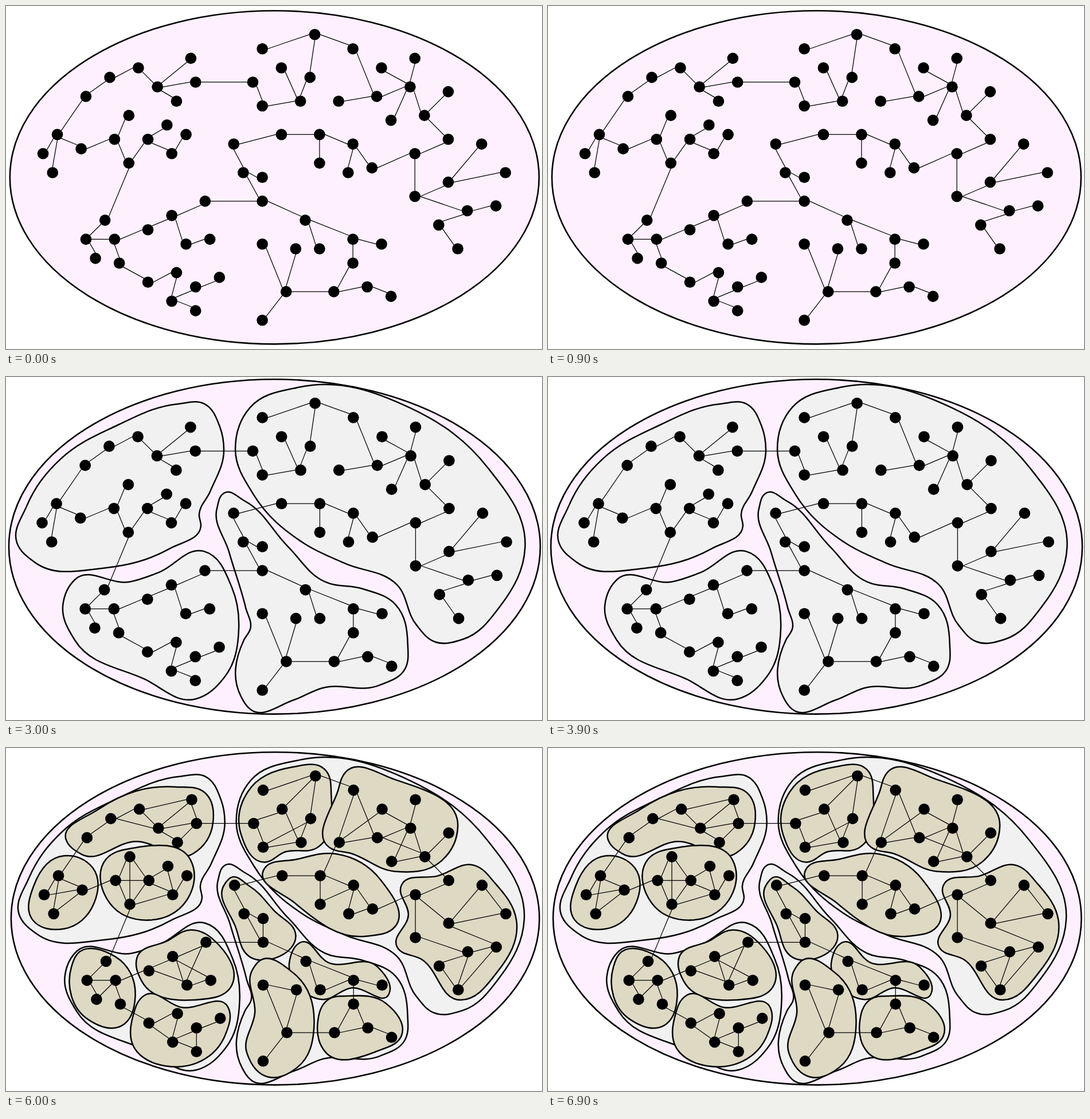
An HTML page that plays this animation: 935x599 px, repeating every 7500 ms.

```html
<!DOCTYPE html>
<html lang="en">
<head>
<meta charset="utf-8">
<title>Hierarchical clustering of a graph</title>
<style>
  html, body { margin: 0; width: 100%; height: 100%; overflow: hidden; background: #fff; }
  svg { display: block; width: 935px; height: 599px; }
</style>
</head>
<body>
<svg id="stage" viewBox="0 0 935 599"></svg>
<script>
const HOLD = 1500, UNIT = 8.3, PORT = 9.3;
const GREY = '#f1f1f1', PINK = '#fff0ff', YELLOW = '#ffff00', GREEN = '#c3d69b',
      ORANGE = '#fac090', TAN = '#ddd9c3', BLUE = '#c6d9f1', AQUA = '#b7dee8';

// Origin and size of one grid cell in each scene.
const scenes = [
  { x: 64.6, y: 49.8, s: 8.316 },
  { x: 62.8, y: 48.9, s: 8.33, regions: 'own' },
  { x: 63.0, y: 45.8, s: 8.352, regions: GREY },
  { x: 70.5, y: 47.8, s: 8.278, regions: GREY, clusters: 'own', bridge: true },
  { x: 66.6, y: 48.7, s: 8.302, regions: GREY, clusters: TAN, bridge: true, dense: true }
];

// Node positions in grid cells, by region.
const nodeGroups = [
  `31,5 20,7 14,9 24,11 32,10 28,14 9,13 3,21 0,25 2,29 8,24 15,22 18,17 18,27 22,22 26,19 27,25 30,21`,
  `44,10 46,15 54,14 50,7 56,9 57,0 46,3 65,3 70,13 62,14 77,11 71,7 78,5 73,18 80,17 85,12
   85,22 78,25 69,28 65,23 64,29 58,21 58,27 50,21 78,34 85,31 92,23 97,29 89,37 95,36 83,40 87,45`,
  `40,23 42,29 46,30 46,35 55,39 58,45 65,43 71,44 65,48 61,54 68,53 73,55 51,54 53,45 46,44 46,60`,
  `34,35 27,38 30,44 35,43 22,41 15,43 9,43 11,47 13,39 16,48 22,52 28,50 27,56 32,53 32,58 37,51`
];

// Edges as chains of node numbers.
const treeChains = `0-3-1-2-6-7-10-11-13-14-16-17 5-3-4-18 8-7-9 11-12 14-15 13-74
  18-19-20-22-23-25-26-28-32-34-35-36-37-39-41-50 20-21 23-24 26-27 29-28-30
  28-31 32-33 37-38 39-40 35-42-46-48-49 44-43-45 46-47
  50-51-53-54-56-58-59-62-65 51-52 54-55 56-57 59-60-61 63-62-64
  53-66-67-70-71-75-76-77-78-79-81 67-68-69 71-72-73 72-74 78-80`;
const sparseChains = '42-43';
const bridgeChains = '27-39';
const denseChains = `2-3 1-0-4-5 8-10-9 13-12-14-11 15-16-13 23-21-18 19-22 25-27-29
  26-32-31 40-37 38-36 35-43-47-49-46 44-45 52-53 55-56 58-60 63-64
  73-71 67-69 70-68-66 76-78 79-80`;

// Key points of each outline; the curve between them is computed.
const regions = [
  [GREY, `300,50 345,50 372,90 379,130 355,203 336,243 339,263 285,302 170,336 50,326 19,292 36,228
    95,146 190,89`],
  [YELLOW, `510,21 425,56 399,130 430,207 520,294 590,328 680,365 714,435 745,464 795,460 860,402
    903,300 838,161 705,58`],
  [GREEN, `380,205 367,232 388,308 417,405 425,442 414,461 409,560 425,582 500,566 550,545 650,540
    694,512 699,470 678,400 620,372 555,360 490,298 415,219`],
  [ORANGE, `345,307 393,370 405,440 380,526 330,564 240,529 120,462 99,400 120,356 215,360 265,344`]
];
const clusters = [
  [GREEN, '300,67 350,77 364,130 330,183 230,162 135,184 109,160 165,106'],
  [AQUA, '105,187 155,208 157,270 105,314 50,298 52,240'],
  [TAN, '228,173 325,194 318,265 250,299 185,270 178,193'],
  [TAN, '500,33 558,36 570,85 545,173 490,180 452,198 413,150 425,75'],
  [GREEN, '595,41 680,54 790,135 760,197 680,214 605,183 566,172 581,75'],
  [BLUE, '580,184 655,228 681,310 630,327 505,268 452,212 510,193'],
  [YELLOW, '820,204 855,235 892,300 858,390 795,438 728,368 684,345 704,290 692,238 755,222'],
  [YELLOW, '395,225 428,240 470,282 508,325 430,364 403,310 384,237'],
  [TAN, '516,338 565,373 650,380 670,428 605,417 553,437 497,372'],
  [BLUE, '600,431 665,444 692,500 650,527 560,529 546,480 565,437'],
  [GREEN, '445,370 505,392 540,480 510,556 460,572 423,530 437,460 433,385'],
  [YELLOW, '128,358 195,363 229,430 205,483 147,472 118,380'],
  [BLUE, '325,316 375,343 397,412 330,438 240,405 232,364 285,335'],
  [TAN, '245,430 310,451 390,450 385,500 335,548 222,508 224,470']
];

const words = text => text.trim().split(/\s+/);
const parsePoints = text => words(text).map(pair => pair.split(',').map(Number));
const point = p => p.map(v => v.toFixed(1)).join();

function add(parent, tag, attrs = {}) {
  const el = document.createElementNS('http://www.w3.org/2000/svg', tag);
  for (const key in attrs) el.setAttribute(key, attrs[key]);
  return parent.appendChild(el);
}

// Closed smooth curve; each tangent is that of the circle through three neighbours.
function smoothPath(points) {
  const n = points.length, at = i => points[(i + n) % n];
  const gap = i => Math.hypot(at(i + 1)[0] - at(i)[0], at(i + 1)[1] - at(i)[1]);
  const handle = (i, reach) => {
    const before = gap(i - 1), after = gap(i);
    const t = at(i).map((v, k) =>
      (v - at(i - 1)[k]) * after / before + (at(i + 1)[k] - v) * before / after);
    const size = Math.hypot(...t);
    return point(at(i).map((v, k) => v + t[k] / size * reach));
  };
  const curves = points.map((_, i) =>
    `C${handle(i, gap(i) * 0.36)} ${handle(i + 1, gap(i) * -0.36)} ${at(i + 1)}`);
  return `M${at(0)}${curves.join('')}Z`;
}

// Each node has eight connection ports; an edge joins the closest pair.
const nodes = nodeGroups.flatMap(parsePoints).map(p => p.map(v => v * UNIT));
const ports = ([x, y]) => Array.from({ length: 8 }, (_, i) =>
  [x + PORT * Math.cos(i * Math.PI / 4), y + PORT * Math.sin(i * Math.PI / 4)]);

function edgePath(a, b) {
  let best = { length: Infinity };
  for (const p of ports(a)) for (const q of ports(b)) {
    const length = Math.hypot(q[0] - p[0], q[1] - p[1]);
    if (length < best.length - 0.01) best = { length, p, q };
  }
  return `M${point(best.p)}L${point(best.q)}`;
}

function addEdges(chains) {
  const d = words(chains).map(chain => {
    const ids = chain.split('-');
    return ids.slice(1).map((id, i) => edgePath(nodes[ids[i]], nodes[id])).join('');
  }).join('');
  return add(root, 'path', { d, fill: 'none', stroke: '#000', 'stroke-width': 1.25 });
}

// Layer whose shapes use the pixel coordinates of one scene.
function addBlobs(blobs, { x, y, s }) {
  const group = add(root, 'g', {
    transform: `scale(${UNIT / s}) translate(${-x} ${-y})`, stroke: '#000', 'stroke-width': 2.5
  });
  for (const [fill, text] of blobs) add(group, 'path', { d: smoothPath(parsePoints(text)), fill });
  return group;
}

const root = add(document.getElementById('stage'), 'g');
add(root, 'ellipse', {
  cx: 48.55 * UNIT, cy: 30 * UNIT, rx: 55.5 * UNIT, ry: 35 * UNIT,
  fill: PINK, stroke: '#000', 'stroke-width': 2.6
});
const regionLayer = addBlobs(regions, scenes[1]);
const clusterLayer = addBlobs(clusters, scenes[3]);
addEdges(treeChains);
const sparseEdges = addEdges(sparseChains);
const bridgeEdges = addEdges(bridgeChains);
const denseEdges = addEdges(denseChains);
for (const [cx, cy] of nodes) add(root, 'circle', { cx, cy, r: 9.8 });

const show = (el, on) => el.setAttribute('visibility', on ? 'visible' : 'hidden');

function paint(layer, blobs, mode) {
  show(layer, mode);
  if (!mode) return;
  blobs.forEach(([own], i) => layer.children[i].setAttribute('fill', mode === 'own' ? own : mode));
}

function render(time) {
  const scene = scenes[Math.floor(time / HOLD) % scenes.length];
  root.setAttribute('transform', `translate(${scene.x} ${scene.y}) scale(${scene.s / UNIT})`);
  paint(regionLayer, regions, scene.regions);
  paint(clusterLayer, clusters, scene.clusters);
  show(sparseEdges, !scene.dense);
  show(bridgeEdges, scene.bridge);
  show(denseEdges, scene.dense);
}

const start = performance.now();
function tick() {
  render(performance.now() - start);
  requestAnimationFrame(tick);
}
tick();
</script>
</body>
</html>
```
